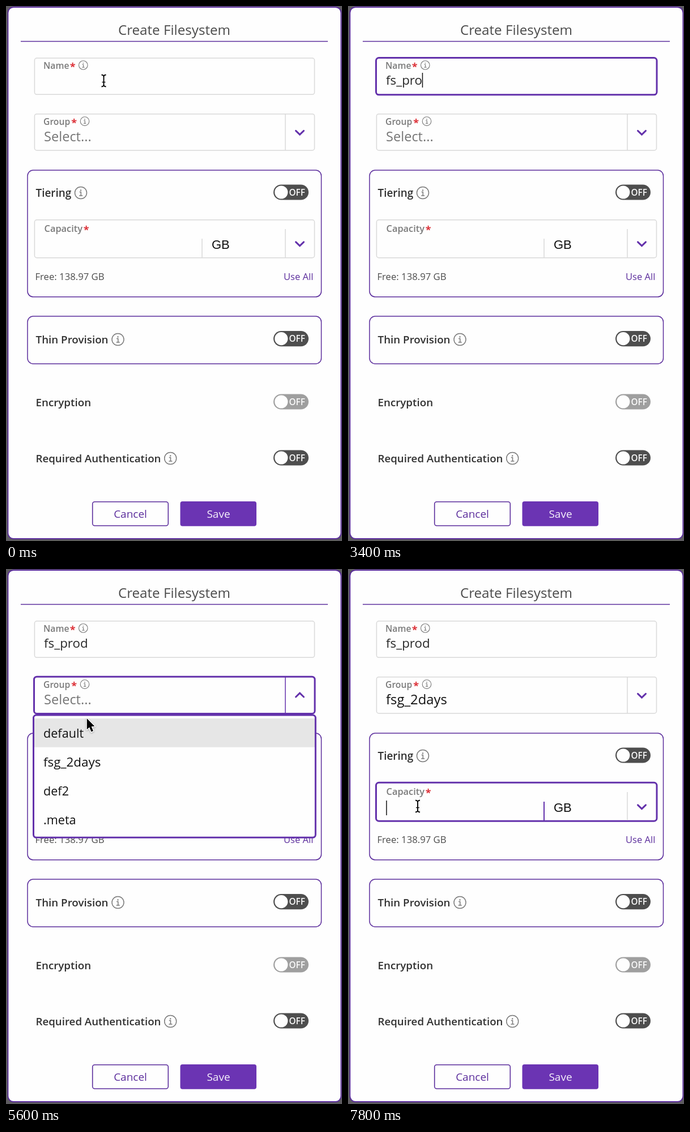
An HTML page with a canvas for the animation above (8000 ms loop, 593 by 945 pixels).

```html
<!DOCTYPE html>
<html lang="en">
<head>
<meta charset="utf-8">
<title>Create Filesystem</title>
<style>
  html, body { margin: 0; width: 100%; height: 100%; overflow: hidden; background: #5d5b60; }
  canvas { display: block; width: 593px; height: 945px; }
</style>
</head>
<body>
<canvas id="stage"></canvas>
<script>
const W = 593, H = 945, LOOP = 8000, STEP = 200;
const PURPLE = '#5b2d9c', FOCUS = '#6331ab', BUTTON = '#6b34b3';
const LINE = '#d9d9d9', GREY = '#7a7a7a', DARK = '#303030', PAPER = '#fefefe';
const SANS = '"Open Sans", "Noto Sans", sans-serif';

const canvas = document.getElementById('stage');
const ctx = canvas.getContext('2d');
const dpr = window.devicePixelRatio || 1;
canvas.width = W * dpr;
canvas.height = H * dpr;

function text(str, x, y, size, color, weight = 400, align = 'left', family = SANS) {
  ctx.font = `${weight} ${size}px ${family}`;
  ctx.fillStyle = color;
  ctx.textAlign = align;
  ctx.fillText(str, x, y);
}

function box(x0, y0, x1, y1, r, stroke, width, fill) {
  ctx.beginPath();
  ctx.roundRect(x0, y0, x1 - x0, y1 - y0, r);
  if (fill) { ctx.fillStyle = fill; ctx.fill(); }
  if (stroke) { ctx.strokeStyle = stroke; ctx.lineWidth = width; ctx.stroke(); }
}

function line(points, color, width, cap = 'butt') {
  ctx.beginPath();
  points.forEach(([x, y]) => ctx.lineTo(x, y));
  ctx.strokeStyle = color;
  ctx.lineWidth = width;
  ctx.lineCap = cap;
  ctx.lineJoin = 'miter';
  ctx.stroke();
}

function disc(x, y, r, color) {
  ctx.beginPath();
  ctx.arc(x, y, r, 0, Math.PI * 2);
  ctx.fillStyle = color;
  ctx.fill();
}

function info(x, y, r) {
  const k = r / 10.5, w = Math.max(1.1, 1.5 * k);
  ctx.beginPath();
  ctx.arc(x, y, r, 0, Math.PI * 2);
  ctx.strokeStyle = GREY;
  ctx.lineWidth = w;
  ctx.stroke();
  disc(x, y - 4.6 * k, 1.2 * k, GREY);
  line([[x - 2.4 * k, y - 1.4 * k], [x + .3, y - 1.4 * k], [x + .3, y + 5 * k]], GREY, w);
  line([[x - 2.8 * k, y + 5 * k], [x + 3.2 * k, y + 5 * k]], GREY, w);
}

function label(str, x, y, size, starX) {
  text(str, x, y, size, GREY, 600);
  text('*', starX, y + 3, 18, '#dc2f36', 700);
}

function toggle(y, color) {
  box(472, y - 13.6, 534, y + 13.6, 13.6, null, 0, color);
  disc(485.8, y, 11.6, PAPER);
  text('OFF', 499.5, y + 5.8, 15.3, '#fafafa', 600);
}

function chevron(y, dir) {
  line([[511.5, y - 3.4 * dir], [518.5, y + 3.4 * dir], [525.5, y - 3.4 * dir]], FOCUS, 3, 'round');
}

function field(y0, y1, focused) {
  if (focused) box(49.5, y0 - .5, 545, y1 + .5, 5, FOCUS, 3);
  else box(50.4, y0, 544.5, y1, 4, LINE, 1.5);
}

function caret(x, y0, y1) {
  line([[x, y0], [x, y1]], '#111', 1.5);
}

function arrow(x, y) {
  const shape = [[0, 0], [0, 19.5], [4.4, 15.6], [7.8, 23.6], [11.2, 22], [7.9, 14.3], [13.6, 13.8]];
  ctx.save();
  ctx.translate(x, y);
  ctx.beginPath();
  shape.forEach(([px, py]) => ctx.lineTo(px, py));
  ctx.closePath();
  ctx.lineJoin = 'round';
  ctx.strokeStyle = '#fff';
  ctx.lineWidth = 3;
  ctx.shadowColor = 'rgba(0,0,0,.3)';
  ctx.shadowBlur = 3;
  ctx.shadowOffsetY = 1;
  ctx.stroke();
  ctx.shadowColor = 'transparent';
  ctx.fillStyle = '#000';
  ctx.fill();
  ctx.restore();
}

function beam(x, y) {
  for (const [color, w] of [['#fff', 4], ['#000', 1.9]]) {
    line([[x, y - 9], [x, y + 9]], color, w);
    line([[x - 3, y + 2.5], [x + 3, y + 2.5]], color, w * .7);
    for (const s of [-1, 1]) {
      line([[x - 4, y + 10.5 * s], [x - 1.5, y + 10 * s], [x, y + 8 * s],
        [x + 1.5, y + 10 * s], [x + 4, y + 10.5 * s]], color, w);
    }
  }
}

// Pointer keys: time, x, y
const PATH = [
  [0, 172.5, 132], [4400, 172.5, 132], [4800, 149.5, 236.5], [5400, 149.5, 236.5],
  [6000, 123.5, 342.5], [7000, 123.5, 342.5], [7400, 123, 419]
];

function pointer(t) {
  let i = PATH.length - 1;
  while (PATH[i][0] > t) i--;
  const [t0, x0, y0] = PATH[i];
  const [t1, x1, y1] = PATH[i + 1] || [LOOP, x0, y0];
  const k = (t - t0) / (t1 - t0), e = k * k * (3 - 2 * k);
  return [x0 + (x1 - x0) * e, y0 + (y1 - y0) * e];
}

const NAME = 'fs_prod';
const KEYS = [1600, 2000, 2400, 2800, 3000, 3200, 3600];
const FOCUS_AT = 400, SPELL_AT = 4400, OPEN_AT = 5000, PICK_AT = 6600, CAPACITY_AT = 7600;
const blink = (t, since) => (t - since) % 1000 < 500;

function drawName(t) {
  const active = t >= FOCUS_AT && t < OPEN_AT;
  const typed = KEYS.filter(k => k <= t);
  field(92, 156.3, active);
  label('Name', 66, 111, 15.7, 112.8);
  info(136.3, 104.5, 7.8);
  text(NAME.slice(0, typed.length), 67, 139, 22.3, '#262626');
  const end = 67 + ctx.measureText(NAME.slice(0, typed.length)).width;
  if (active && t >= SPELL_AT) {
    for (let x = 69; x < end; x += 4) disc(x, 142, 1.5, '#e0444a');
  }
  if (active && blink(t, typed.length ? typed[typed.length - 1] : FOCUS_AT)) caret(end + .5, 118, 144);
}

function drawGroup(t) {
  const open = t >= OPEN_AT && t < PICK_AT;
  const active = t > OPEN_AT && t < CAPACITY_AT;
  field(190.7, 255, active);
  line([[493, 191], [493, 255]], active ? FOCUS : LINE, 1.5);
  label('Group', 66, 210, 15.7, 115.3);
  info(139, 203.6, 7.8);
  chevron(open ? 222.6 : 223.8, open ? -1 : 1);
  if (t < PICK_AT) text('Select...', 67, 239, 23.6, '#757575');
  else text('fsg_2days', 67, 239, 23.8, '#111');
  if (open && blink(t, OPEN_AT)) caret(65.8, 215, 244);
}

function drawMenu(t, y) {
  const hover = y > 264 ? Math.floor((y - 264) / 51) : -1;
  box(48.5, 258, 546.3, 474.3, 5, null, 0, PAPER);
  const row = hover < 0 ? 0 : hover;
  ctx.fillStyle = row ? '#f2f2f3' : '#e6e6e6';
  ctx.fillRect(49, 264 + row * 50.8, 497, 50.8);
  box(48.5, 258, 546.3, 474.3, 5, FOCUS, 3);
  ['default', 'fsg_2days', 'def2', '.meta'].forEach((s, i) =>
    text(s, 66, 298 + i * 51, i === 1 ? 22.4 : 21.6, '#111'));
}

function drawTiering(t) {
  const active = t >= CAPACITY_AT;
  box(38, 290, 556.5, 513.8, 10, PURPLE, 1.5);
  text('Tiering', 52.5, 337, 18.9, DARK, 600);
  info(132, 330, 10.5);
  toggle(329, '#4e4e4e');
  field(377.8, 444.7, active);
  label('Capacity', 67.5, 399, 16.4, 136.8);
  line([[346, 411], [346, 444]], active ? FOCUS : LINE, active ? 2 : 1.5);
  line([[493, 394], [493, 444]], LINE, 1.5);
  text('GB', 363, 428.5, 22, '#111', 400, 'left', '"Liberation Sans", Arial, sans-serif');
  chevron(420.3, 1);
  text('Free: 138.97 GB', 51.5, 484, 16.7, '#4c4c4c');
  text('Use All', 542.3, 484, 16.5, PURPLE, 400, 'right');
  if (active && blink(t, CAPACITY_AT)) caret(68, 409, 435);
}

function drawRest() {
  box(38, 548, 556.5, 632, 10, PURPLE, 1.5);
  text('Thin Provision', 52.5, 595.7, 18.8, DARK, 600);
  info(197.5, 589, 10.5);
  toggle(587.6, '#4e4e4e');
  text('Encryption', 52.5, 707, 18.8, DARK, 600);
  toggle(699, '#9f9f9f');
  text('Required Authentication', 52.5, 806, 18.7, DARK, 600);
  info(290.2, 799, 10.5);
  toggle(798, '#4e4e4e');
  box(152.7, 875.7, 286.3, 918, 4, PURPLE, 1.6);
  text('Cancel', 219.5, 904, 19, PURPLE, 400, 'center');
  box(307.5, 875, 442, 918.7, 4, null, 0, BUTTON);
  text('Save', 375, 904, 19, '#f6f2fb', 400, 'center');
}

function draw(t) {
  const [x, y] = pointer(t);
  ctx.setTransform(dpr, 0, 0, dpr, 0, 0);
  ctx.fillStyle = '#5d5b60';
  ctx.fillRect(0, 0, W, H);
  box(3.5, 2, 591.3, 941, 10, PURPLE, 1.8, PAPER);
  text('Create Filesystem', 297, 51, 24.2, '#4b4b4b', 400, 'center');
  line([[26, 62.5], [568, 62.5]], PURPLE, 1.5);
  drawName(t);
  drawGroup(t);
  drawTiering(t);
  drawRest();
  if (t >= OPEN_AT && t < PICK_AT) drawMenu(t, y);
  if (t < KEYS[0] || t >= SPELL_AT) {
    const overInput = y < 157 || (t >= PICK_AT && y > 405);
    (overInput ? beam : arrow)(x, y);
  }
}

const start = performance.now();
function tick() {
  const t = (performance.now() - start) % LOOP;
  draw(Math.floor(t / STEP) * STEP);
  requestAnimationFrame(tick);
}
tick();
</script>
</body>
</html>
```
